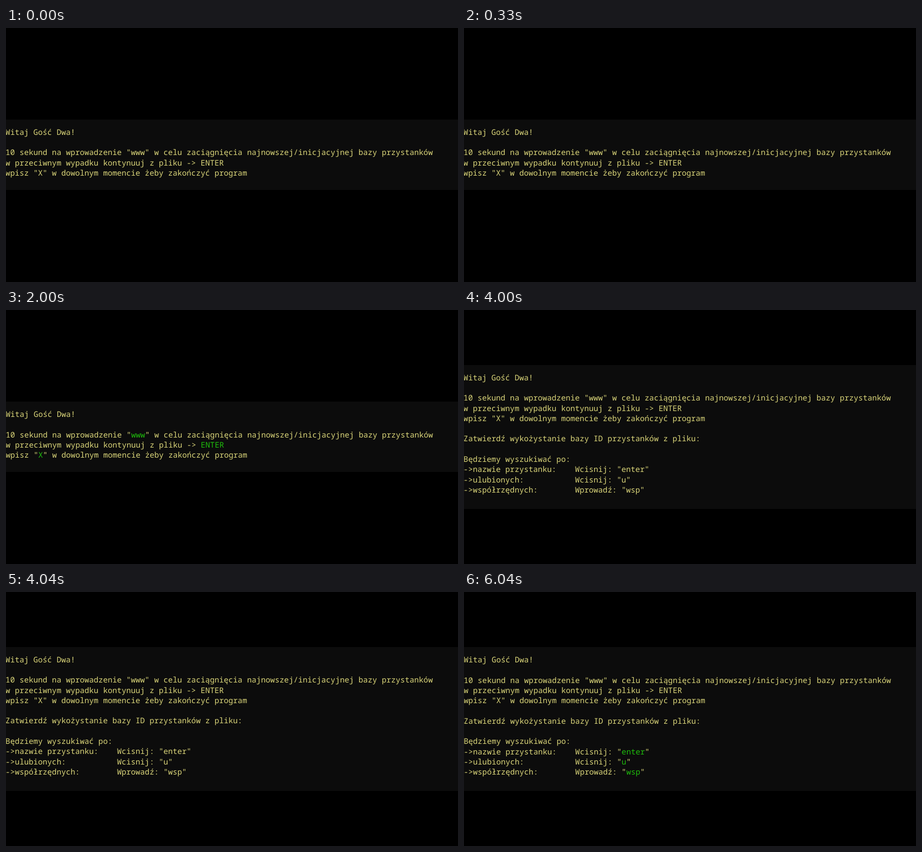
Animation of 854 by 480 pixels, one loop 8 s. Source, as an HTML page:

```html
<!DOCTYPE html>
<html lang="pl">
<head>
<meta charset="utf-8">
<title>Przystanki</title>
<style>
  html, body { margin: 0; width: 100%; height: 100%; overflow: hidden; background: #000; }
  svg { display: block; width: 854px; height: 480px; }
  text {
    font: 14.63px "Noto Sans Mono", "DejaVu Sans Mono", monospace;
    font-variant-ligatures: none;
    text-rendering: geometricPrecision;
    white-space: pre;
    fill: #dbd67a;
  }
  .lit .key { fill: #1fbe0c; }
</style>
</head>
<body>
<svg viewBox="0 0 854 480">
  <rect width="854" height="480" fill="#000"/>
  <rect id="panel" width="854" fill="#0c0c0c"/>
  <g id="console"></g>
</svg>
<script>
const LOOP = 8000;
const LINE_HEIGHT = 19.28;
const LEFT = -0.9;

const option = (label, action) => label.padEnd(24) + action;

// Braces mark the keys that light up.
const intro = [
  'Witaj Gość Dwa!',
  '',
  '10 sekund na wprowadzenie "{www}" w celu zaciągnięcia najnowszej/inicjacyjnej bazy przystanków',
  'w przeciwnym wypadku kontynuuj z pliku -> {ENTER}',
  'wpisz "{X}" w dowolnym momencie żeby zakończyć program'
];
const menu = [
  '',
  'Zatwierdź wykożystanie bazy ID przystanków z pliku:',
  '',
  'Będziemy wyszukiwać po:',
  option('->nazwie przystanku:', 'Wcisnij: "{enter}"'),
  option('->ulubionych:', 'Wcisnij: "{u}"'),
  option('->współrzędnych:', 'Wprowadź: "{wsp}"')
];

const scenes = [
  { start: 0, top: 173, height: 133, menu: false, lit: false },
  { start: 2000, top: 173, height: 133, menu: false, lit: true },
  { start: 4000, top: 104, height: 272, menu: true, lit: false },
  { start: 6010, top: 104, height: 272, menu: true, lit: true }
];

const panel = document.getElementById('panel');
const consoleGroup = document.getElementById('console');

function svgElement(tag, attributes, parent) {
  const node = document.createElementNS('http://www.w3.org/2000/svg', tag);
  for (const name in attributes) node.setAttribute(name, attributes[name]);
  return parent.appendChild(node);
}

function addSection(lines, firstRow) {
  const group = svgElement('g', {}, consoleGroup);
  lines.forEach((line, i) => {
    if (!line) return;
    const y = (firstRow + i) * LINE_HEIGHT;
    const text = svgElement('text', { x: LEFT, y }, group);
    line.split(/[{}]/).forEach((part, j) => {
      const span = svgElement('tspan', j % 2 ? { class: 'key' } : {}, text);
      span.textContent = part;
    });
  });
  return group;
}

const introGroup = addSection(intro, 0);
const menuGroup = addSection(menu, intro.length);
let shown = null;

function render(time) {
  const scene = scenes.findLast(s => time >= s.start);
  if (scene === shown) return;
  shown = scene;
  panel.setAttribute('y', scene.top);
  panel.setAttribute('height', scene.height);
  const nudge = scene.lit ? 0.4 : 0;
  consoleGroup.setAttribute('transform', `translate(${nudge} ${scene.top + 28.8 + nudge})`);
  menuGroup.setAttribute('visibility', scene.menu ? 'visible' : 'hidden');
  introGroup.classList.toggle('lit', scene.lit && !scene.menu);
  menuGroup.classList.toggle('lit', scene.lit && scene.menu);
}

function tick() {
  render(performance.now() % LOOP);
  requestAnimationFrame(tick);
}
tick();
</script>
</body>
</html>
```
